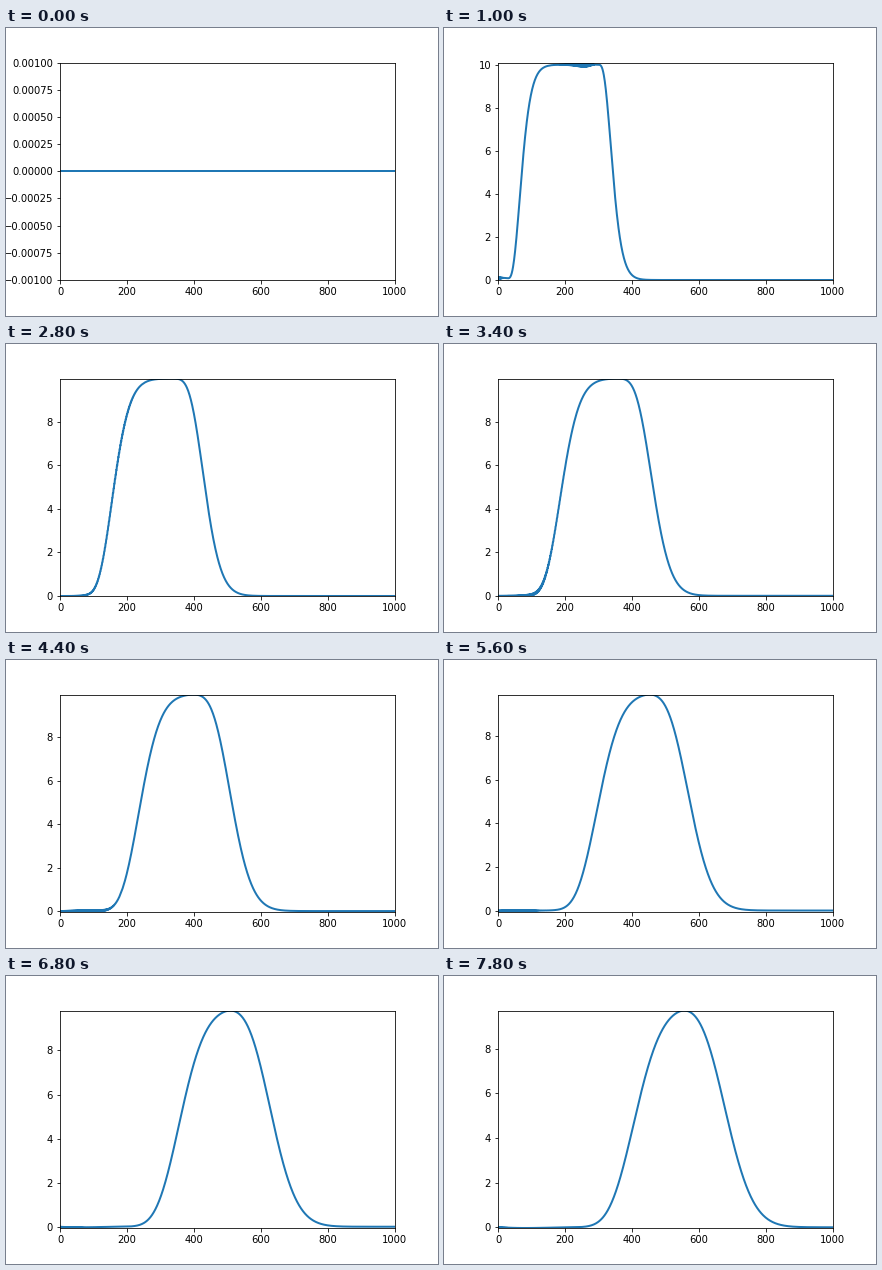
Write a matplotlib script that moves like this. It is 432 px wide and 288 px high and loops after 8 s.

```python
import numpy as np
import matplotlib.pyplot as plt
from matplotlib.animation import FuncAnimation

FRAMES, INTERVAL = 40, 200
SIZE = 1001          # grid points, spacing 1
COURANT = 10         # cells travelled per step
START, STOP, HEIGHT = 25, 297, 10

plt.rcParams.update({
    "font.family": "DejaVu Sans",
    "font.size": 10,
    "figure.dpi": 72,
    "savefig.dpi": "figure",
})


def solve():
    """Advect a square pulse: implicit Euler in time, central in space."""
    matrix = np.eye(SIZE)
    inner = np.arange(1, SIZE - 1)
    matrix[inner, inner + 1] = COURANT / 2
    matrix[inner, inner - 1] = -COURANT / 2
    step = np.linalg.inv(matrix)

    u = np.zeros(SIZE)
    u[START:STOP] = HEIGHT
    states = [np.zeros(SIZE)]      # opens on an empty state
    for _ in range(1, FRAMES):
        u = step @ u
        states.append(u)
    return states


x = np.arange(SIZE)
states = solve()

fig = plt.figure(figsize=(6, 4), facecolor="white")
fig.subplots_adjust(left=0.125, right=0.9, bottom=0.125, top=0.88)
ax = fig.add_subplot()
ax.set_xlim(0, 1000)
line, = ax.plot(x, states[0], color="#1f77b4", lw=2)


def update(i):
    u = states[i]
    low, high = u.min(), u.max()
    if low == high:
        low, high = low - 0.001, high + 0.001
    line.set_ydata(u)
    ax.set_ylim(low, high)
    return line,


anim = FuncAnimation(fig, update, frames=FRAMES, interval=INTERVAL,
                     init_func=lambda: update(0), repeat=True, repeat_delay=0)
plt.show()
```
